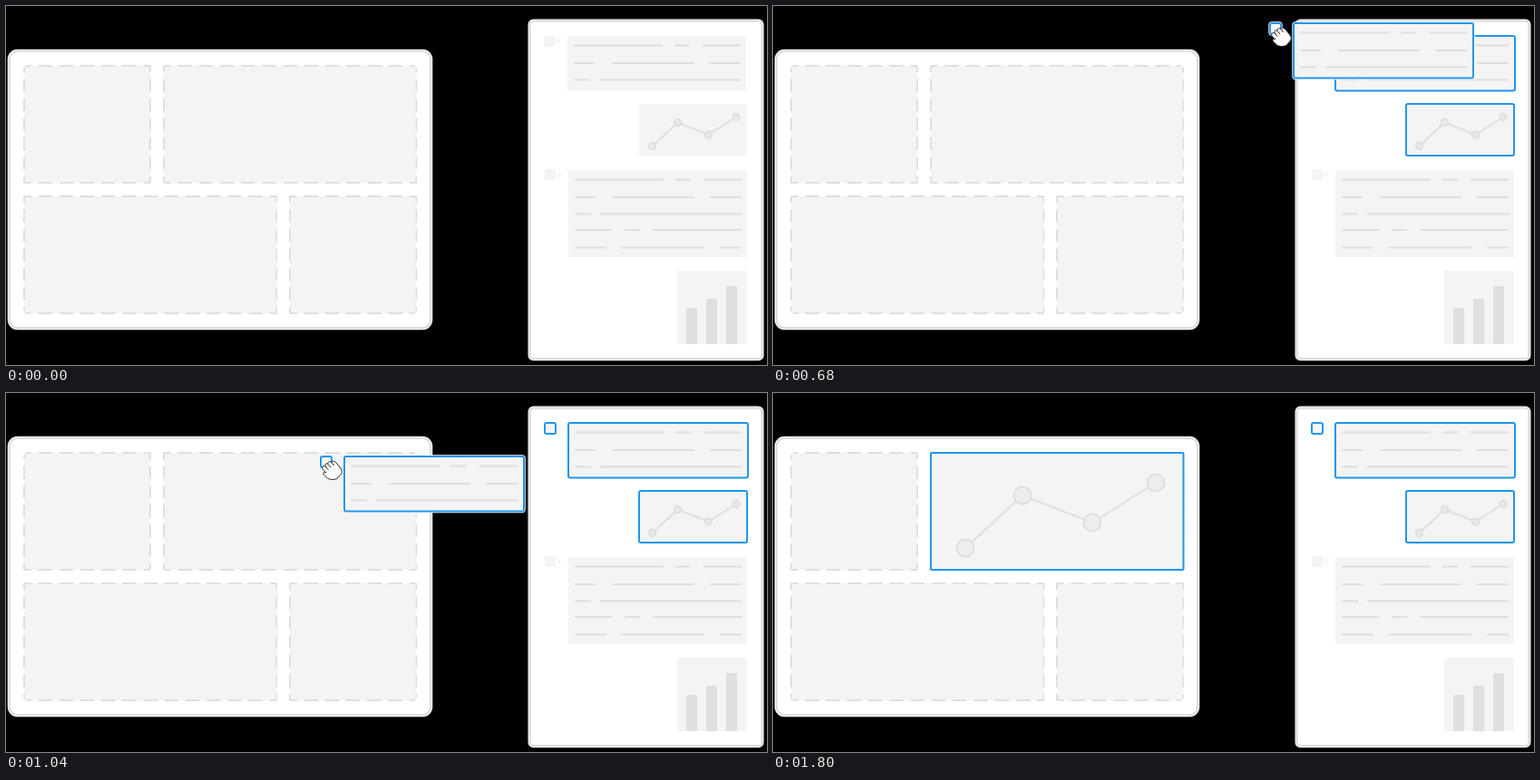
Animation of 839 by 396 pixels, one loop 2.24 s. Source, as an HTML page with a canvas:

```html
<!DOCTYPE html>
<html lang="en">
<head>
<meta charset="utf-8">
<title>Drag a block into a layout</title>
<style>
  html, body { margin: 0; height: 100%; overflow: hidden; background: #000; }
  canvas { display: block; }
</style>
</head>
<body>
<canvas id="stage" width="839" height="396"></canvas>
<script>
const ctx = document.getElementById('stage').getContext('2d');
const LOOP = 2240;
const FILL = '#f4f4f4', LINE = '#dfdfdf', BLUE = '#2196ed', SKY = '#c1e0f8';

// Drag route, travelled at constant speed
const route = document.createElementNS('http://www.w3.org/2000/svg', 'path');
route.setAttribute('d', 'M0 0Q-165 -65 -280 72');
const routeLength = route.getTotalLength();

const hand = new Path2D('M600 51C597 49 595 46 596 44.5C597 43 598.5 43.5 600 45C597.5 41.5 600 40 602 41.5' +
  'C601.5 38.5 604 38 606 39.5C607 37.5 609.5 38 611 40L616 46C618 49 617.5 51 615.5 53.5L612 57.5' +
  'C608 59 603 59 600.5 56C598 54 596.5 52.5 597 51C597.5 49.8 599 50 600 51Z');
const knuckles = new Path2D('M600 45l2.4 2.6M602 41.5l3 3.6M606 39.5l2.6 3.5');

// Start and end of each dash in a row of placeholder text
const textRows = [
  [627, 725, 738, 755, 769, 811],
  [627, 650, 669, 759, 776, 811],
  [627, 645, 655, 811],
  [627, 668, 682, 699, 713, 811],
  [627, 662, 678, 770, 787, 811]
];
const rowOffsets = [10.5, 30, 48.5, 66, 85.5];

function box(x, y, w, h, radius, fill, stroke, width = 2) {
  ctx.beginPath();
  ctx.roundRect(x, y, w, h, radius);
  if (fill) { ctx.fillStyle = fill; ctx.fill(); }
  if (stroke) { ctx.strokeStyle = stroke; ctx.lineWidth = width; ctx.stroke(); }
}

function withAlpha(alpha, draw) {
  if (alpha <= 0) return;
  ctx.save();
  ctx.globalAlpha = alpha;
  draw();
  ctx.restore();
}

function card(x, y, w, h, radius) {
  box(x, y, w, h, radius, '#fff', '#fff', 4);
  box(x, y, w, h, radius, null, LINE, 2.6);
}

// Dashes are fitted to every side so that each corner is solid
function dashedSide(x1, y1, x2, y2) {
  const length = Math.hypot(x2 - x1, y2 - y1);
  const period = length / Math.round(length / 23.2);
  ctx.setLineDash([period * 0.66, period * 0.34]);
  ctx.lineDashOffset = period * 0.33;
  ctx.beginPath();
  ctx.moveTo(x1, y1);
  ctx.lineTo(x2, y2);
  ctx.stroke();
}

function cell(x, y, w, h, roundCorner, fill = FILL, stroke = LINE) {
  const radii = r => [0, 1, 2, 3].map(i => i === roundCorner ? r : 0);
  const right = x + w, bottom = y + h;
  ctx.save();
  ctx.beginPath();
  ctx.roundRect(x - 1, y - 1, w + 2, h + 2, radii(6));
  ctx.clip();
  box(x, y, w, h, radii(5), fill);
  ctx.strokeStyle = stroke;
  ctx.lineWidth = 2;
  dashedSide(x, y, right, y);
  dashedSide(right, y, right, bottom);
  dashedSide(x, bottom, right, bottom);
  dashedSide(x, y, x, bottom);
  ctx.restore();
}

function wideCell(fill, stroke) {
  cell(174, 66, 278.5, 129, 1, fill, stroke);
}

function textBlock(y, h, rowCount, selected) {
  if (selected) box(620, y, 198, h, 2, FILL, BLUE);
  else box(620, y, 197, h, 0, FILL);
  ctx.fillStyle = LINE;
  for (let i = 0; i < rowCount; i++) {
    const row = textRows[i];
    for (let j = 0; j < row.length; j += 2) {
      ctx.fillRect(row[j], y + rowOffsets[i] - 1, row[j + 1] - row[j], 2);
    }
  }
}

function icon(x, y, selected) {
  if (selected) box(x, y, 12, 12, 2, FILL, BLUE);
  else box(x, y, 12, 12, 0, FILL);
}

function grip(x, y) {
  box(x, y, 3.5, 7, [3, 0, 0, 3], FILL);
}

function lineChart(points, radius, dotFill) {
  ctx.strokeStyle = LINE;
  ctx.lineWidth = 2;
  ctx.beginPath();
  points.forEach(p => ctx.lineTo(...p));
  ctx.stroke();
  for (const [x, y] of points) {
    ctx.beginPath();
    ctx.arc(x, y, radius, 0, 2 * Math.PI);
    ctx.fillStyle = dotFill;
    ctx.fill();
    ctx.stroke();
  }
}

function drawHand() {
  ctx.fillStyle = '#fff';
  ctx.fill(hand);
  ctx.strokeStyle = '#222';
  ctx.lineWidth = 1;
  ctx.stroke(hand);
  ctx.stroke(knuckles);
}

function layoutCard() {
  card(3.7, 49.7, 464.6, 305.6, 9);
  cell(20, 66, 139, 129, 0);
  wideCell();
  cell(20, 210, 278.5, 129, 3);
  cell(313, 210, 139.5, 129, 2);
}

function sourceCard(selected) {
  card(577.5, 16.5, 256, 372.8, 4);

  ctx.save();
  if (!selected) ctx.translate(-1, 0);
  grip(608, 35);
  icon(594, 33, selected);
  textBlock(33, 60.5, 3, selected);
  ctx.restore();

  if (selected) box(698, 108, 119, 57, 2, FILL, BLUE);
  else box(698, 108, 119, 57, 0, FILL);
  lineChart([[712.5, 154.5], [740.5, 128.5], [774.5, 142], [805, 122.5]], 3.7, '#e9e9e9');

  icon(594, 180, false);
  grip(608, 182);
  textBlock(181, 96, 5, false);

  box(740, 292, 77, 81, 0, FILL);
  [[750, 333], [772, 323], [794, 309]].forEach(([x, top]) =>
    box(x, top, 12, 373 - top, [1.5, 1.5, 0, 0], LINE));
}

function draggedCopy() {
  box(620, 33, 198, 60.5, 2, null, '#fff', 3.4);
  box(594, 33, 12, 12, 2, null, '#fff', 3.4);
  textBlock(33, 60.5, 3, true);
  icon(594, 33, true);
  drawHand();
}

function droppedChart() {
  box(174, 66, 278.5, 129, 1, FILL, BLUE);
  lineChart([[212, 171], [275, 113], [352, 143], [422, 99]], 9.5, '#ededed');
}

function clamp01(v) {
  return Math.min(1, Math.max(0, v));
}

// Progress from start to end, advancing in equal steps
function stepped(t, start, end, step) {
  return clamp01(Math.floor((t - start) / step) * step / (end - start));
}

function render(t) {
  ctx.fillStyle = '#000';
  ctx.fillRect(0, 0, 839, 396);

  layoutCard();
  const reveal = stepped(t, 1360, 1800, 40);
  if (t >= 1160) withAlpha(1 - reveal, () => wideCell(SKY, BLUE));
  withAlpha(reveal, droppedChart);

  sourceCard(t >= 320);
  if (t >= 600) {
    const { x, y } = route.getPointAtLength(routeLength * stepped(t, 600, 1120, 20));
    withAlpha(1 - stepped(t, 1280, 1360, 20), () => {
      ctx.translate(Math.round(x), Math.round(y));
      draggedCopy();
    });
  } else if (t >= 160) {
    drawHand();
  }
}

const startTime = performance.now();
function tick() {
  render((performance.now() - startTime) % LOOP);
  requestAnimationFrame(tick);
}
tick();
</script>
</body>
</html>
```
